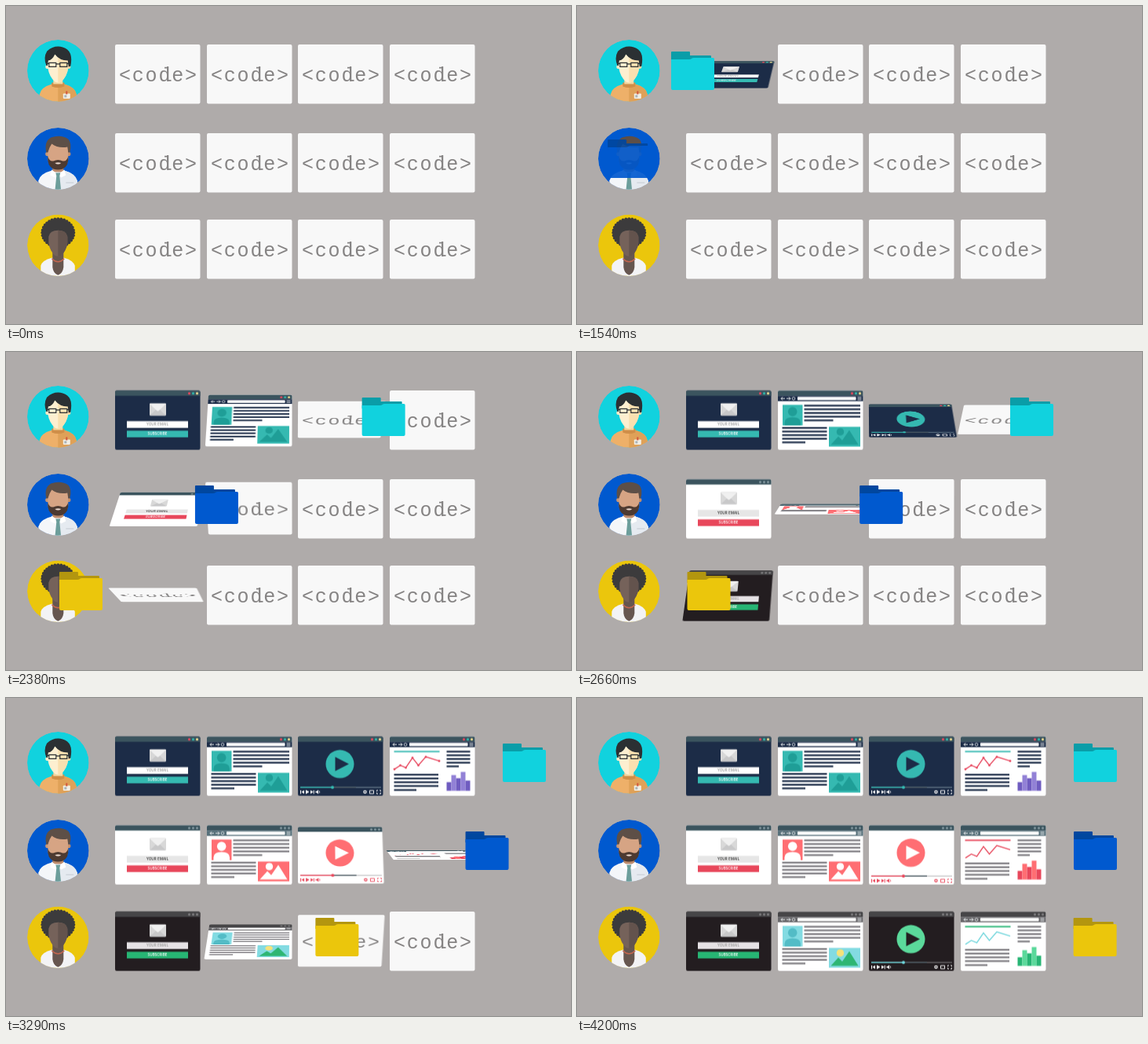
An HTML page for the animation above (5250 ms loop, 720 by 405 pixels).

```html
<!DOCTYPE html>
<html lang="en">
<head>
<meta charset="utf-8">
<title>Code to pages</title>
<style>
html, body { margin: 0; width: 100%; height: 100%; overflow: hidden; background: #afabaa; }
#stage { position: absolute; left: 0; top: 0; width: 720px; height: 405px; overflow: hidden; }
#stage svg { position: absolute; left: 0; top: 0; overflow: visible; }
.row { position: absolute; left: 0; width: 720px; height: 75.6px; perspective: 1000px; perspective-origin: 368px 50%; }
.card { position: absolute; top: 0; width: 108.5px; height: 75.6px; }
.back { transform: scaleY(-1); transform-origin: 50% 37.8px; }
.folder { position: absolute; left: 0; width: 55px; height: 49px; }
.code { font: 25px "Liberation Mono", "Courier New", monospace; letter-spacing: 1.8px; fill: #858383; }
.label { font: 600 4.7px "Open Sans", sans-serif; text-anchor: middle; }
</style>
</head>
<body>
<div id="stage"></div>
<script>
const LOOP = 5250, STEP = 70, FLIP = 700, TRAVEL = 2160;
const X0 = 39, X1 = 633;

// go: when the folder leaves; flips: when each card starts to turn
const rows = [
  {
    y: 49.2, cy: 82.4, fy: 57.5, go: 1020, flips: [1085, 1795, 2178, 2425],
    disc: '#11d2de', tab: '#0a9da8',
    bar: '#3b545e', dots: ['#e8475e', '#2fb8ad', '#f0dc90'], nav: '#1c2c47',
    dark: '#1c2c47', ink: '#1c2c47', field: '#fff', hint: '#9a9a9a', button: '#35b9b1',
    tile: '#35b9b1', shape: '#1f9e97', sun: '#1f9e97',
    play: '#35b9b1', played: '#35b9b1', track: '#5d7183', icon: '#fff',
    head: '#35b9b1', chart: '#e8475e', chartDots: true, bars: ['#6f5cc0', '#9281d6']
  },
  {
    y: 161.6, cy: 194.4, fy: 169.8, go: 1524, flips: [1894, 2271, 2656, 2905],
    disc: '#0059cf', tab: '#00479f',
    bar: '#3b545e', dots: ['#7f949c', '#7f949c', '#7f949c'], nav: '#57707a',
    dark: '#fff', ink: '#7d7b80', field: '#e6e6e6', hint: '#333', button: '#e8475b',
    tile: '#ff6e73', shape: '#fff', sun: '#fff',
    play: '#ff6e73', played: '#e8475b', track: '#c9c9cb', icon: '#e8475b',
    head: '#e8475b', chart: '#e8475b', bars: ['#e8475b', '#ff6e73']
  },
  {
    y: 271.8, cy: 304.8, fy: 280.3, go: 2074, flips: [2083, 2800, 3177, 3345],
    disc: '#ebc60c', tab: '#b3960f',
    bar: '#464547', dots: ['#7c7b7d', '#7c7b7d', '#7c7b7d'], nav: '#68676a',
    dark: '#231d20', ink: '#7d7b80', field: '#e6e2e5', hint: '#999', button: '#27b574',
    tile: '#83dbe2', shape: '#53bcc6', sun: '#f5e27a', hill: '#2eb673',
    play: '#5bd99b', played: '#6fd6dc', track: '#666466', icon: '#fff',
    head: '#27b574', chart: '#6fd6dc', bars: ['#27b574', '#5bd99b']
  }
];

const rect = (x, y, w, h, fill, r = 0) =>
  `<rect x="${x}" y="${y}" width="${w}" height="${h}" rx="${r}" fill="${fill}"/>`;
const dot = (x, y, r, fill) => `<circle cx="${x}" cy="${y}" r="${r}" fill="${fill}"/>`;
const shape = (d, fill) => `<path d="${d}" fill="${fill}"/>`;
const line = (d, stroke, w = 1) => `<path d="${d}" fill="none" stroke="${stroke}" stroke-width="${w}"/>`;
const svg = (w, h, body, cls = '') => `<svg class="${cls}" width="${w}" height="${h}">${body}</svg>`;

// A paragraph: equal lines, the last one shorter
const para = (x, w, last, ys, c) =>
  ys.map((y, i) => rect(x, y - 1.1, i === ys.length - 1 ? last : w, 2.2, c)).join('');

const page = (p, bg) => rect(0, 0, 108.5, 75.6, bg, 2) +
  shape('M0 6.8V2Q0 0 2 0H106.5Q108.5 0 108.5 2V6.8Z', p.bar) +
  p.dots.map((c, i) => dot(94.5 + i * 5, 3.8, 1.6, c)).join('');

const browser = p => page(p, '#fff') + rect(0, 6.8, 108.5, 6.9, p.nav) +
  line('M4 10.3H9M6 8.3L4 10.3L6 12.3M11 10.3H16M14 8.3L16 10.3L14 12.3', '#e4e8ea', 1) +
  `<circle cx="20" cy="10.3" r="1.8" fill="none" stroke="#e4e8ea" stroke-width=".8"/>` +
  rect(25, 8.2, 74.5, 4.2, '#fff', .6) +
  line('M101.5 8.6H106.5M101.5 10.3H106.5M101.5 12H106.5', '#e4e8ea', .8);

function email(p) {
  return page(p, p.dark) +
    rect(44, 16.3, 21, 15.9, '#d8d8d8', 1.2) +
    shape('M44.5 31.8L54.5 22L64.5 31.8Z', '#c8c8c9') +
    shape('M44 16.8H65L56 25.5Q54.5 27 53 25.5Z', '#f0f0f0') +
    rect(15, 39.1, 78, 8.6, p.field) +
    `<text class="label" x="54" y="45.1" fill="${p.hint}">YOUR EMAIL</text>` +
    rect(15, 51.2, 78, 8.5, p.button) +
    '<text class="label" x="54" y="57.1" fill="#fff">SUBSCRIBE</text>';
}

function article(p) {
  return browser(p) +
    rect(6, 18.3, 25.5, 26.2, p.tile) + dot(18.7, 27, 5.8, p.shape) +
    shape('M8.5 44.5V41Q9 34 18.7 34Q28.5 34 29 41V44.5Z', p.shape) +
    para(33.5, 71.5, 37, [19.3, 24, 28.7, 33.4, 38.1], p.ink) +
    para(5.5, 57, 29.5, [47.7, 52.3, 56.9, 61.5, 66.1], p.ink) +
    rect(65, 46.3, 40, 25.2, p.tile) + dot(79.5, 52.7, 4.7, p.sun) +
    shape('M67.5 69L77 58.5L82 63.5L91 50.5L102.5 69Z', p.hill || p.shape);
}

function video(p) {
  return page(p, p.dark) + dot(53.5, 35.2, 18, p.play) + shape('M47.5 26.2L65 35.2L47.5 44.2Z', p.dark) +
    rect(3, 64.2, 103, 1.4, p.track) + rect(44, 64.2, 30, 1.4, '#4c5a63') +
    rect(3, 64.2, 41, 1.4, p.played) + dot(44, 64.9, 2, p.played) +
    shape('M3 68.5H4V73H3ZM8 68.5V73L4.5 70.7ZM10 68.2L14.5 70.7L10 73.3ZM16 68.5L19.5 70.7L16 73ZM19.7 68.5H20.7V73H19.7ZM22.5 69.8H24L26 68.2V73.3L24 71.7H22.5Z', p.icon) +
    line('M27 69.2Q28.6 70.7 27 72.3', p.icon, .8) +
    `<circle cx="85.5" cy="70.7" r="1.6" fill="none" stroke="${p.icon}" stroke-width="1.2"/>` +
    line('M91.5 68.8H96.5V72.8H91.5ZM100.5 70V68.6H102M104 68.6H105.5V70M105.5 71.6V73H104M102 73H100.5V71.6', p.icon, .9);
}

function report(p) {
  const pts = [[6, 41.7], [13.5, 36.8], [20.5, 39.8], [29, 27.2], [36.5, 36.8], [46, 26], [63, 31.2]];
  return browser(p) + rect(5.5, 18.3, 58, 1.8, p.head) +
    line('M' + pts.join('L'), p.chart, 1.4) +
    (p.chartDots ? pts.map(q => dot(q[0], q[1], 1.4, p.chart)).join('') : '') +
    para(72.5, 30, 15.5, [19.3, 24, 28.7, 33.4, 38.1], p.ink) +
    para(5.5, 56.5, 28.5, [48.7, 53.5, 58.3, 63.1, 68.2], p.ink) +
    [11, 20, 16, 24, 13].map((h, i) => rect(72.5 + i * 6, 69.2 - h, 6, h, p.bars[i % 2])).join('');
}

const front = rect(0, 0, 108.5, 75.6, '#f8f8f8', 2) +
  '<text class="code" x="5" y="46.8">&lt;code&gt;</text>' +
  line('M63 29.6H67.5M68 45.9H71.5', '#858383', 1.7);

const curls = [...Array(32)].map((_, i) => {
  const a = i * Math.PI / 16;
  return dot((20 * Math.cos(a)).toFixed(1), (-16 + 17.5 * Math.sin(a)).toFixed(1), 2, '#3c3b3c');
}).join('');

const faces = [
  // glasses and badge
  shape('M-23.5 42V30Q-22 21 -8 17H8Q22 21 23.5 30V42Z', '#eeb069') +
  shape('M0 17H8Q22 21 23.5 30V42H0Z', '#dfa158') +
  shape('M-8 15H8V20Q0 23 -8 20Z', '#cf8e48') +
  rect(-6, 5, 12, 12, '#f3d6a0') +
  dot(-13.5, -5, 2.5, '#fdebc6') + dot(13.5, -5, 2.5, '#f5d9a4') +
  shape('M-13 -21V-4Q-11.5 7 -4 14Q0 16 4 14Q11.5 7 13 -4V-21Z', '#fdefd0') +
  shape('M0 -21V15Q3 15 4 14Q11.5 7 13 -4V-21Z', '#f9e0b0') +
  shape('M-15 -7Q-19 -17 -14 -25Q-5 -33 6 -30Q20 -26 16 -6L13.5 -5L12.5 -13Q2 -13 -4 -21Q-7 -14 -12.5 -13L-13.5 -6Z', '#2b3033') +
  line('M-11.5 -10H-2.5V-5H-11.5ZM2.5 -10H11.5V-5H2.5ZM-2.5 -8.5H2.5M-14 -9H-11.5M11.5 -9H14', '#2b3033', 1.2) +
  rect(6.5, 29, 9, 6.5, '#f2eee4', .8) + rect(8, 31, 3, 3, '#a9b4b8') + rect(10, 26, 2, 4, '#d2573e'),
  // beard and tie
  shape('M-25 42V28Q-23 19 -8 15H8Q22 19 24.5 28V42Z', '#f4f6f9') +
  shape('M0 15H8Q22 19 24.5 28V42H0Z', '#e5eaf0') +
  rect(-7, 8, 14, 9, '#bd8b6c') +
  shape('M-8 14L0 20L8 14L10 21L4 24L0 19L-4 24L-10 21Z', '#fff') +
  shape('M-3 18H3L2 22L4 42H-4L-2 22Z', '#6c9e9b') +
  dot(-13.5, -6, 2.6, '#c99775') + dot(13.5, -6, 2.6, '#c08d6c') +
  shape('M-13 -20V0Q-12 12 0 13Q12 12 13 0V-20Z', '#d6a484') +
  shape('M-13 -3Q-11 4 -6 3Q0 0 6 3Q11 4 13 -3Q14 9 6 13Q0 15 -6 13Q-14 9 -13 -3Z', '#4d3a31') +
  shape('M-4 5.5Q0 4 4 5.5Q0 8.5 -4 5.5Z', '#e8d6cc') +
  shape('M-15 -8Q-18 -22 -9 -27Q4 -31 13 -25Q18 -20 15 -8H13L12 -15Q0 -13 -8 -19Q-11 -15 -13 -8Z', '#5d4f47') +
  rect(10, 30, 10, 1.3, '#ccd3da'),
  // round hair and necklace
  curls + `<ellipse cx="0" cy="-16" rx="20.5" ry="18" fill="#3c3b3c"/>` +
  shape('M-22 42V26Q-20 19 -8 16H8Q19 19 21.5 26V42Z', '#f3f3f5') +
  shape('M-7 8H7V28Q6 36 0 38Q-6 36 -7 28Z', '#665650') +
  shape('M-12 -11Q-10.5 -19 0 -19Q10.5 -19 12 -11V-3Q10.5 7 4 13Q0 15 -4 13Q-10.5 7 -12 -3Z', '#75625a') +
  shape('M0 -19Q10.5 -19 12 -11V-3Q10.5 7 4 13Q2 14 0 14Z', '#63534d') +
  line('M-8 17Q0 25 8 17', '#c4664f', 1.5)
];

const avatars = '<defs><clipPath id="disc"><circle r="39.3"/></clipPath></defs>' +
  rows.map((p, i) => `<g transform="translate(66.3 ${p.cy})"><g clip-path="url(#disc)">` +
    dot(0, 0, 39.3, p.disc) + faces[i] + '</g></g>').join('');

const folder = p => shape('M0 1Q0 0 1 0H23Q24 0 24 1V5H50Q51 5 51 6V14H0Z', p.tab) +
  shape('M0 10H23Q25 10 26 9Q27 8 29 8H53.5Q55 8 55 9.5V47Q55 49 53 49H2Q0 49 0 47Z', p.disc);

const pages = [email, article, video, report];
const stage = document.getElementById('stage');
stage.innerHTML = svg(720, 405, avatars) +
  rows.map(p => `<div class="row" style="top:${p.y}px">` +
    pages.map((draw, i) => `<div class="card" style="left:${139 + i * 116.5}px">` +
      svg(108.5, 75.6, front) + svg(108.5, 75.6, draw(p), 'back') + '</div>').join('') +
    '</div>').join('') +
  rows.map(p => `<div class="folder" style="top:${p.fy}px">${svg(55, 49, folder(p))}</div>`).join('');

const cards = [...stage.querySelectorAll('.card')];
const folders = [...stage.querySelectorAll('.folder')];
const clamp = v => Math.max(0, Math.min(1, v));
const sine = u => (1 - Math.cos(Math.PI * u)) / 2;

function render(t) {
  rows.forEach((p, r) => {
    p.flips.forEach((start, c) => {
      const card = cards[r * 4 + c];
      const angle = 180 * clamp((t - start) / FLIP);
      card.style.transform = `rotateX(${-angle}deg)`;
      card.children[0].style.display = angle < 90 ? '' : 'none';
      card.children[1].style.display = angle < 90 ? 'none' : '';
    });
    const x = X0 + (X1 - X0) * sine(clamp((t - p.go) / TRAVEL));
    folders[r].style.transform = `translateX(${x.toFixed(2)}px)`;
    folders[r].style.opacity = clamp((t - p.go + 140) / 170);
  });
}

const began = performance.now();
function tick() {
  const t = (performance.now() - began) % LOOP;
  render(Math.floor(t / STEP) * STEP);
  requestAnimationFrame(tick);
}
render(0);
requestAnimationFrame(tick);
</script>
</body>
</html>
```
